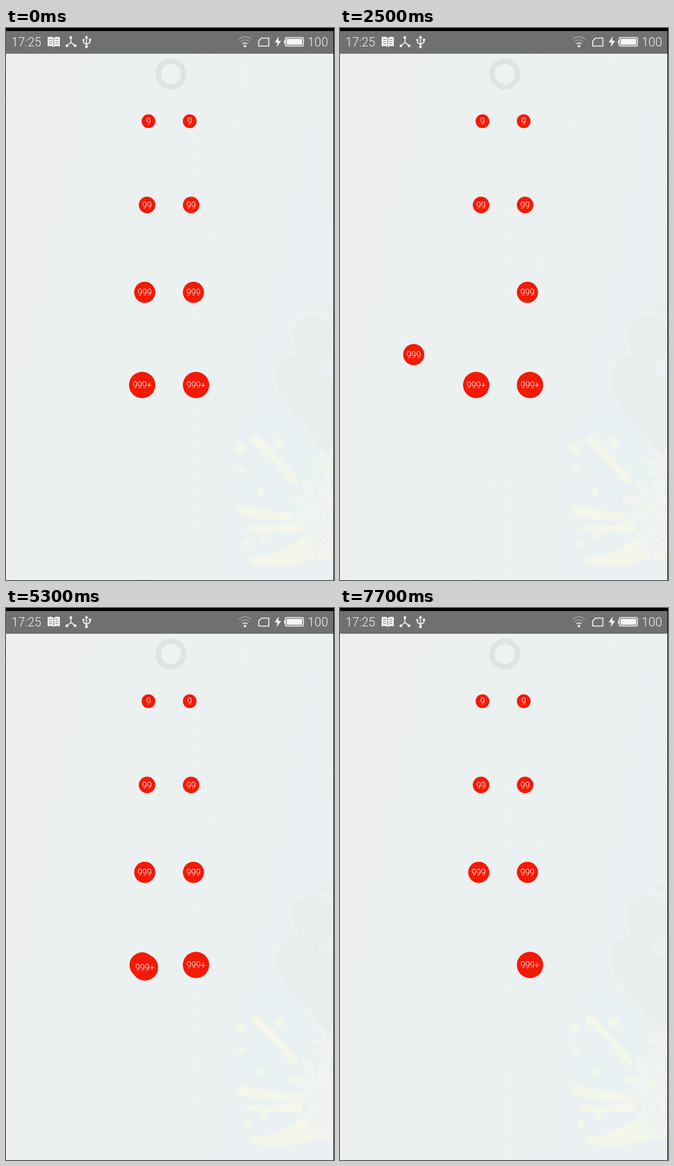
An HTML page with a canvas that plays this animation: 536x900 px, repeating every 8000 ms.

```html
<!DOCTYPE html>
<html lang="en">
<head>
<meta charset="utf-8">
<title>Draggable badges</title>
<style>
  html, body { margin: 0; width: 100%; height: 100%; overflow: hidden; background: #ecf1f1; }
  svg, canvas { position: absolute; left: 0; top: 0; width: 536px; height: 900px; }
  text { font: 300 20px Roboto, sans-serif; fill: #f4f5f4; }
</style>
</head>
<body>
<svg viewBox="0 0 536 900">
  <defs>
    <linearGradient id="paper" x2="1" y2=".35">
      <stop stop-color="#eeefed"/>
      <stop offset=".35" stop-color="#ecf0f0"/>
      <stop offset="1" stop-color="#ebf1f2"/>
    </linearGradient>
    <radialGradient id="wash">
      <stop stop-color="#e8f1f2"/>
      <stop offset="1" stop-color="#e8f1f2" stop-opacity="0"/>
    </radialGradient>
  </defs>
  <rect width="536" height="900" fill="url(#paper)"/>
  <ellipse cx="480" cy="740" rx="125" ry="160" fill="url(#wash)"/>

  <!-- figure -->
  <g fill="#e9edec">
    <path d="M509 459L523 448L536 460V466Z"/>
    <path d="M468 489Q480 468 504 470Q530 472 534 500L530 535L508 557Q522 568 536 571V690L517 712Q512 668 488 645Q440 605 442 562Q450 538 480 532Q470 520 472 505Q464 500 468 489Z"/>
  </g>

  <!-- splashes -->
  <g fill="#f4f6ea">
    <path d="M401 668Q407 659 416 668Q440 695 472 728L480 748L462 740Q440 705 402 676Z"/>
    <path d="M377 784Q380 775 396 780Q430 788 468 792L470 804Q425 804 390 796Q378 793 377 784Z"/>
    <path d="M392 815Q400 808 420 812L482 808L486 822Q440 822 400 821Q392 820 392 815Z"/>
    <path d="M398 866Q404 858 430 860Q470 845 492 825L536 810V868Q500 862 470 876Q430 878 405 874Z"/>
    <circle cx="383" cy="686" r="8"/><circle cx="447" cy="676" r="8"/>
    <circle cx="385" cy="721" r="6"/><circle cx="417" cy="756" r="5.5"/>
    <circle cx="421" cy="829" r="6"/><circle cx="394" cy="840" r="6"/>
  </g>
  <g id="flowers" fill="#f0f4f1" stroke="#e9eeec"></g>

  <circle cx="269.5" cy="75" r="21" fill="#eef2f2" stroke="#e0e3e2" stroke-width="9"/>

  <!-- status bar -->
  <rect width="536" height="5"/>
  <rect y="5" width="536" height="37" fill="#6f716f"/>
  <rect x="535" width="1" height="900"/>
  <text x="9" y="30">17:25</text>
  <text x="493" y="30">100</text>
  <g fill="#f4f5f4">
    <path d="M68 15Q74 13 78 16Q82 13 88 15V30Q82 28 78 31Q74 28 68 30Z"/>
    <circle cx="106" cy="15.500" r="2.200"/><circle cx="99.500" cy="29" r="2.200"/><circle cx="113" cy="29" r="2.200"/>
    <path d="M131.500 12l3 4.500h-6zM135.500 17.500h3.500v3.500h-3.500z"/>
    <circle cx="126.500" cy="19.500" r="1.800"/><circle cx="131.500" cy="30.500" r="2.300"/>
    <path d="M445.500 14L439 23.500H443.500L442.500 31L449.500 21H445Z"/>
    <rect x="458.500" y="17.500" width="25.500" height="10" rx="1"/>
    <rect x="454.500" y="20" width="2.500" height="5.500"/>
    <circle cx="390.500" cy="29.500" r="2"/>
  </g>
  <path d="M70.500 18.500h5M70.500 22h5M70.500 25.500h5M80.500 18.500h5M80.500 22h5M80.500 25.500h5M78 16v14" stroke="#6f716f"/>
  <g fill="none" stroke="#f4f5f4" stroke-width="1.600">
    <path d="M106 16V23.500L99.500 29M106 23.500L113 29M131.500 14V30M126.500 20V23.500L131.500 27M137.200 20V23.500L131.500 27"/>
    <rect x="456.500" y="15.500" width="29.500" height="14" rx="2"/>
    <path d="M417.500 16.500H429.500V29.500H413V21Z"/>
    <path d="M386.500 26Q390.500 22.500 394.500 26"/>
    <path d="M383.500 22.500Q390.500 16 397.500 22.500M380.500 18.500Q390.500 10 400.500 18.500" stroke="#a2a4a2"/>
  </g>
</svg>
<canvas id="stage" width="536" height="900"></canvas>
<script>
const LOOP = 8000, TICK = 100, RED = '#f31a05';
const ctx = document.getElementById('stage').getContext('2d');

const range = n => [...Array(n).keys()];
const flower = (x, y, size) => range(8).map(i =>
  `<ellipse cx="${size * .58}" rx="${size * .45}" ry="${size * .2}" transform="translate(${x} ${y}) rotate(${i * 45 + 15})"/>`
).join('') + `<circle cx="${x}" cy="${y}" r="${size * .14}" fill="#f4f6ea"/>`;
document.getElementById('flowers').innerHTML =
  flower(512, 780, 52) + flower(528, 712, 30) + flower(520, 835, 36);

// Two columns, aligned to the inner edges
const pair = (label, y, r) => [244, 289].map((edge, column) => ({ label, y, r, x: edge + (column ? r : -r) }));
const badges = [...pair('9', 152, 11.2), ...pair('99', 288.5, 13.5), ...pair('999', 431, 17.3), ...pair('999+', 582, 21.5)];
const [hundreds, plus] = [badges[4], badges[6]];

const mix = (a, b, s) => a + (b - a) * s;
const smooth = s => s * s * (3 - 2 * s);

// Catmull-Rom curve through evenly timed points
function curve(points, u) {
  const i = Math.min(Math.floor(u), points.length - 2), s = u - i;
  const [p, a, b, n] = [points[Math.max(i - 1, 0)], points[i], points[i + 1], points[Math.min(i + 2, points.length - 1)]];
  return [0, 1].map(k => mix(a[k], b[k], smooth(s)) +
    s * (1 - s) * ((1 - s) * (b[k] - p[k]) - s * (n[k] - a[k])) / 2);
}

const swirl = [
  [hundreds.x, hundreds.y], [236, 500], [288, 580], [290, 316], [312, 457], [411, 345], [300, 226], [130, 262],
  [120.5, 532.5], [340, 600], [305, 262], [134, 487], [200, 516], [209, 518], [197, 527]
];

// Times in ticks: picked up after `from`, let go at `drop`, at rest after `to`
const drags = [
  { badge: hundreds, from: 2, drop: 44, to: 46,
    path: tick => curve(swirl, Math.min((tick - 1) / 3, swirl.length - 1)) },
  { badge: plus, from: 52, drop: 58, to: 59,
    path(tick) {
      const s = smooth((tick - 52) / 6);
      return [mix(plus.x, 284, s), mix(plus.y, 636, s)];
    } },
  { badge: plus, from: 63, drop: 72, to: 72,
    path(tick) {
      const s = smooth((tick - 63) / 9);
      return [mix(plus.x, 222, s) + 76 * Math.sin(Math.PI * s), mix(plus.y, 428, s)];
    } }
];
const BURST = { start: 72, ticks: 5, x: 222, y: 428 };

// After the drop the badge springs home with a small overshoot
function positionAt({ badge, drop, path }, tick) {
  const [x, y] = path(Math.min(tick, drop));
  const left = (-.05) ** Math.max(tick - drop, 0);
  return [mix(badge.x, x, left), mix(badge.y, y, left)];
}

function disc(x, y, r) {
  ctx.beginPath();
  ctx.arc(x, y, r, 0, Math.PI * 2);
  ctx.fill();
}

function drawBadge({ label, r }, x, y) {
  ctx.fillStyle = RED;
  disc(x, y, r);
  ctx.fillStyle = '#fff';
  ctx.fillText(label, x, y + 5);
}

// The anchor shrinks with distance and the link snaps at six radii
function drawTether({ x: hx, y: hy, r }, x, y) {
  const dx = x - hx, dy = y - hy, dist = Math.hypot(dx, dy);
  if (!dist || dist > 6 * r) return;
  const small = r - dist / 7, nx = -dy / dist, ny = dx / dist;
  const cx = mix(hx, x, .618), cy = mix(hy, y, .618);
  ctx.fillStyle = RED;
  disc(hx, hy, small);
  ctx.beginPath();
  ctx.moveTo(hx + nx * small, hy + ny * small);
  ctx.quadraticCurveTo(cx, cy, x + nx * r, y + ny * r);
  ctx.lineTo(x - nx * r, y - ny * r);
  ctx.quadraticCurveTo(cx, cy, hx - nx * small, hy - ny * small);
  ctx.fill();
}

function noise(n) {
  const v = Math.sin(n * 12.9898) * 43758.5453;
  return v - Math.floor(v);
}

// A grid of dots that scatter, shrink and fade
function drawBurst({ x, y }, r, progress) {
  ctx.save();
  ctx.beginPath();
  ctx.rect(x - r, y - r, 2 * r, 2 * r);
  ctx.clip();
  ctx.fillStyle = RED;
  ctx.globalAlpha = 1 - progress;
  for (const i of range(25)) {
    const px = (i % 5 - 2) * r * .4, py = (Math.floor(i / 5) - 2) * r * .4;
    if (Math.hypot(px, py) > r) continue;
    disc(x + px + progress * (noise(i) - .5) * r, y + py + progress * noise(i + 50) * r * .6, 4 * (1 - progress * .6));
  }
  ctx.restore();
}

function draw(time) {
  const tick = Math.floor(time % LOOP / TICK);
  const active = drags.find(({ from, to }) => tick > from && tick <= to);
  ctx.clearRect(0, 0, 536, 900);
  ctx.font = '300 14px Roboto, sans-serif';
  ctx.textAlign = 'center';
  for (const badge of badges) {
    const gone = badge === plus && tick > BURST.start;
    if (!gone && badge !== active?.badge) drawBadge(badge, badge.x, badge.y);
  }
  if (active) {
    const [x, y] = positionAt(active, tick);
    drawTether(active.badge, x, y);
    drawBadge(active.badge, x, y);
  }
  const progress = (tick - BURST.start) / BURST.ticks;
  if (progress > 0 && progress < 1) drawBurst(BURST, plus.r, progress);
}

const start = performance.now();
function loop() {
  draw(performance.now() - start);
  requestAnimationFrame(loop);
}
loop();
</script>
</body>
</html>
```
